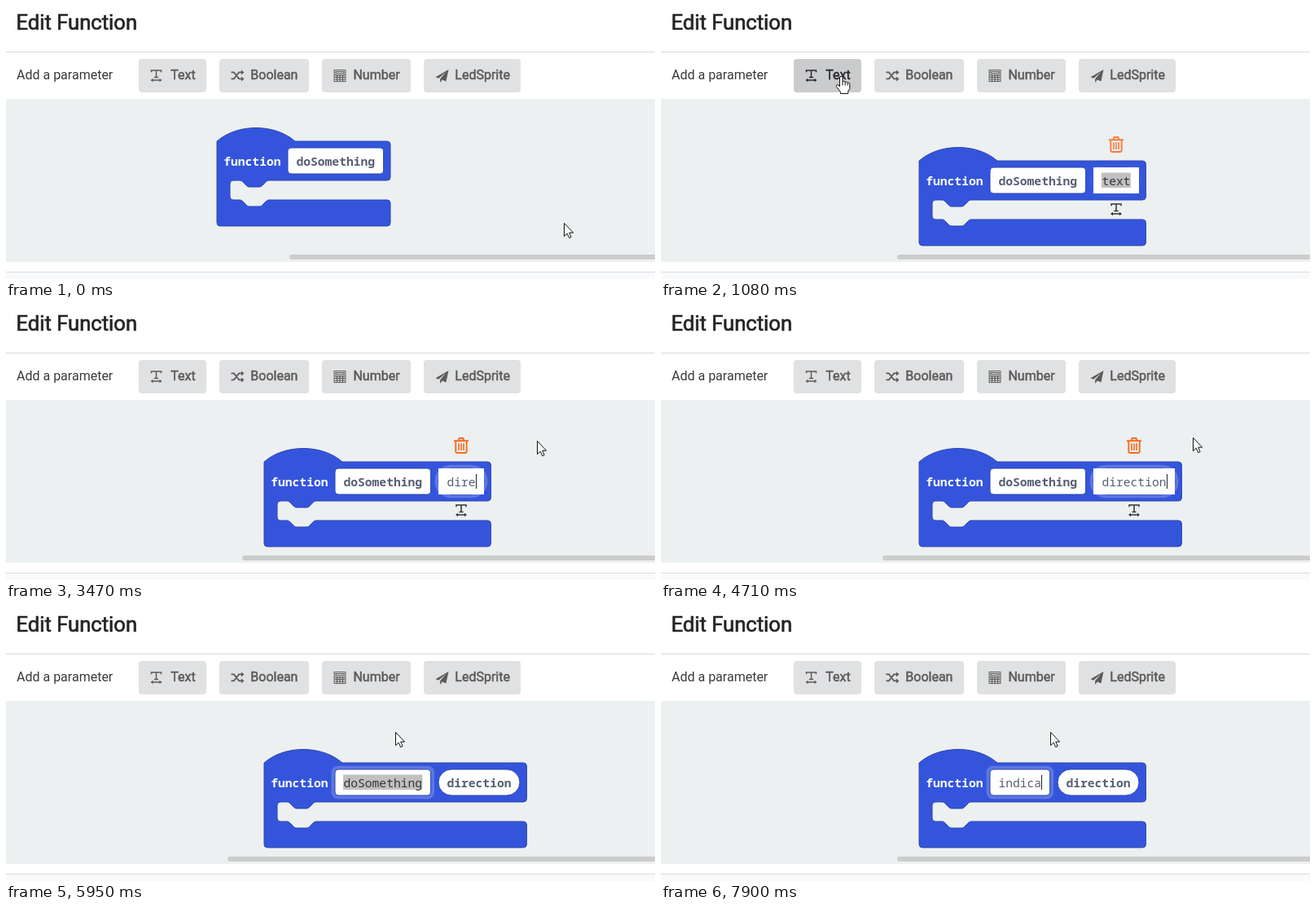
Animation of 797x335 px, one loop 8 s. Source, as an HTML page:

```html
<!DOCTYPE html>
<html lang="en">
<head>
<meta charset="utf-8">
<title>Edit Function</title>
<style>
html, body { margin: 0; width: 100%; height: 100%; overflow: hidden; background: #fff; }
svg { display: block; width: 797px; height: 335px; }
text { white-space: pre; }
.ui { font: 16px Roboto, sans-serif; }
.heavy { stroke-width: .5px; stroke: currentColor; fill: currentColor; }
.mono { font: 14.667px "Noto Sans Mono", "DejaVu Sans Mono", monospace; fill: #575e75; }
.btn { color: #5b5b5c; }
.btn rect.bg { fill: #e0e1e2; }
.btn.hover { color: #29292d; }
.btn.hover rect.bg { fill: #cacbcd; }
.btn.down rect.bg { fill: #babbbc; }
.line { fill: none; stroke: currentColor; }
.solid { fill: currentColor; }
</style>
</head>
<body>
<svg viewBox="0 0 797 335">
  <defs>
    <g id="i-text">
      <path class="line" stroke-width="1.5" d="M1 3.2V.9H13V3.2M7 .9V9.4M4.4 9.4H9.6M2 13H12"/>
      <path class="solid" d="M0 13l3-2.3v4.6zM14 13l-3-2.3v4.6z"/>
    </g>
    <g id="i-bool">
      <path class="line" stroke-width="1.8" d="M0 3.4H3.4L9.6 11.4H13M0 11.4H3.4L9.6 3.4H13"/>
      <path class="solid" d="M12.4 .4l3.6 3-3.6 3zM12.4 8.4l3.6 3-3.6 3z"/>
    </g>
    <g id="i-num">
      <rect class="line" x=".6" y=".6" width="13.8" height="14"/>
      <path class="line" stroke-width="1.2" d="M2.5 2.5H12.5V4.5H2.5zM1 6.6H14M1 9.3H14M1 12H14M4 6.6V14.6M7.5 6.6V14.6M11 6.6V14.6"/>
    </g>
    <path id="i-sprite" class="solid" d="M16 0L0 9.2l3.7 1.6L12.6 3 5.6 11.4V16l2.7-3.5 4.6 2z"/>
  </defs>

  <rect width="797" height="335" fill="#fff"/>
  <text class="ui heavy" x="12.5" y="29" color="#242425" style="font-size:25.6px;stroke-width:.7px">Edit Function</text>
  <rect y="56" width="797" height="1" fill="#d9dadb"/>
  <text class="ui" x="13" y="90" fill="#3a3a3b">Add a parameter</text>
  <g id="buttons"></g>

  <rect y="114" width="797" height="200" fill="#ecf0f1"/>
  <rect y="326" width="797" height="1" fill="#d9dadb"/>
  <rect y="327" width="797" height="8" fill="#f9fafb"/>
  <rect id="scroll" y="305" width="600" height="6" rx="3" fill="#ccc"/>

  <g id="block">
    <path id="body" fill="#3455db" stroke="#2a44af"/>
    <text class="mono" x="8.2" y="30" font-weight="700" style="fill:#fff;font-weight:700">function</text>
    <g id="name"></g>
    <g id="param"></g>
  </g>

  <g id="tools">
    <g fill="none" stroke="#f96a1f" stroke-width="1.9" transform="translate(-9 160)" id="trash">
      <path d="M0 4.2H18M5.4 4L6.6 1H11.4L12.6 4M2.3 4.2V17a2 2 0 0 0 2 2H13.7a2 2 0 0 0 2-2V4.2"/>
      <path stroke-width="1.6" d="M6 7.2V16M9 7.2V16M12 7.2V16"/>
    </g>
    <use href="#i-text" x="-7" y="242" color="#333"/>
  </g>

  <g id="cursor">
    <path id="arrow" fill="#fff" stroke="#111" d="M.5 .5V16.6L4.2 13.2L6.7 18.7L9.1 17.6L6.7 12.2H11.6Z"/>
    <path id="hand" fill="#fff" stroke="#111" stroke-linejoin="round" d="M-1.5 13V2a1.7 1.7 0 0 1 3.5 0V7.6a1.6 1.6 0 0 1 3.2 .4a1.6 1.6 0 0 1 3 .6a1.5 1.5 0 0 1 2.6 1.2V15.5L8.8 18.5V21.5H-.5V19.5L-5.3 13.4a1.6 1.6 0 0 1 2.3-2.4zM2 8V11.5M5.2 8.2V11.5M8.2 8.8V11.5"/>
    <path id="beam" fill="none" stroke="#111" d="M-3.5 -8.5H-1L.5 -7.5L2 -8.5H4.5M.5 -7.5V7.5M-3.5 8.5H-1L.5 7.5L2 8.5H4.5"/>
  </g>
</svg>
<script>
const LOOP = 8000, CHAR = 8.8, PAD = 20.8;
const ADD = 1000, SWITCH = 5400;
const $ = id => document.getElementById(id);

const buttons = [
  [163, 83, 'Text', 'text', 39.2],
  [262, 110, 'Boolean', 'bool', 38.3],
  [388, 109, 'Number', 'num', 38.4],
  [513, 119, 'LedSprite', 'sprite', 38.3]
];
$('buttons').innerHTML = buttons.map(([x, w, label, icon, tx]) => `
  <g class="btn" transform="translate(${x} 65)">
    <rect class="bg" width="${w}" height="41" rx="4"/>
    <use href="#i-${icon}" x="14.5" y="13"/>
    <text class="ui heavy" x="${tx}" y="25">${label}</text>
  </g>`).join('');
const buttonNodes = [...$('buttons').children];

// start, end, steps, x, y
const moves = [
  [150, 920, 11, 221, 86],
  [1460, 1620, 3, 292, 110],
  [1770, 2000, 4, 540, 169],
  [2080, 2230, 3, 652, 164],
  [4710, 4710, 1, 653, 160],
  [4780, 5000, 4, 628, 153],
  [5080, 5400, 5, 480, 212],
  [5550, 5950, 6, 478, 152]
];
const paramKeys = [2840, 3090, 3240, 3470, 3550, 3780, 3850, 4020, 4250];
const nameKeys = [6640, 6790, 7190, 7490, 7660, 7900];

const clamp = v => Math.max(0, Math.min(1, v));
const ease = p => p * p * (3 - 2 * p);
const typed = (word, keys, t) => word.slice(0, keys.filter(k => k <= t).length);

function pointer(t) {
  let x = 685, y = 266;
  for (const [a, b, n, tx, ty] of moves) {
    if (t < a) break;
    const k = n === 1 ? 1 : Math.min(n, Math.floor((t - a) / (b - a) * (n - 1) + 1e-6) + 1);
    const p = n > 6 ? ease(k / n) : k / n;
    x += (tx - x) * p;
    y += (ty - y) * p;
  }
  return [Math.round(x), Math.round(y)];
}

const dip = s => `c${2 * s} 0 ${3 * s} 1 ${4 * s} 2l${4 * s} 4c${s} 1 ${2 * s} 2 ${4 * s} 2h${12 * s}` +
  `c${2 * s} 0 ${3 * s} -1 ${4 * s} -2l${4 * s} -4c${s} -1 ${2 * s} -2 ${4 * s} -2`;
const outline = w => `M0 0c25 -22 71 -22 96 0H${w - 4}a4 4 0 0 1 4 4V44a4 4 0 0 1 -4 4H64${dip(-1)}` +
  `h-8a4 4 0 0 0 -4 4V68a4 4 0 0 0 4 4h8${dip(1)}H${w - 4}a4 4 0 0 1 4 4V100a4 4 0 0 1 -4 4H4a4 4 0 0 1 -4 -4Z`;

// glow is null when the field is not being edited
function field(x, w, text, round, glow, selected) {
  const r = round ? 16 : 4, tx = x + PAD / 2, tw = text.length * CHAR;
  const box = `<rect x="${x}" y="8" width="${w}" height="32" rx="${r}" fill="#fff" stroke="#2a44af"/>`;
  const label = (weight, color) =>
    `<text class="mono" x="${tx}" y="30" style="font-weight:${weight};fill:${color}">${text}</text>`;
  if (glow === null) return box + label(600, '#575e75');
  const halo = `<rect x="${x - 4.5}" y="3.7" width="${w + 9}" height="40.6" rx="${r + 4}" fill="#fff" opacity="${.2 * glow}"/>`;
  const input = round ? `<rect x="${x}" y="8" width="${w}" height="32" fill="#fff"/>` : '';
  const mark = selected
    ? `<rect x="${tx - .4}" y="14.5" width="${tw + .6}" height="18.5" fill="#c0c0c0"/>`
    : `<rect x="${Math.round(tx + tw)}" y="15" width="1" height="18" fill="#222"/>`;
  return halo + box + input + mark + label(400, selected ? '#33353d' : '#575e75');
}

function render(t) {
  const added = t >= ADD, editName = t >= SWITCH, editParam = added && !editName;
  const ox = added ? 317 : 259, oy = added ? 190 : 166;
  const name = typed('indicate', nameKeys, t) || 'doSomething';
  const param = typed('direction', paramKeys, t) || 'text';

  const nameW = name.length * CHAR + PAD;
  const paramX = 87 + nameW + 9.4;
  const paramW = Math.max(2, param.length) * CHAR + PAD;
  const width = (added ? paramX + paramW : 87 + nameW) + 8.4;

  $('block').setAttribute('transform', `translate(${ox} ${oy})`);
  $('body').setAttribute('d', outline(width));
  $('name').innerHTML = field(87, nameW, name, false,
    editName ? clamp((t - SWITCH + 80) / 240) : null, t < nameKeys[0]);
  $('param').innerHTML = added ? field(paramX, paramW, param, true,
    editParam ? clamp((t - 1060) / 170) : null, t < paramKeys[0]) : '';
  $('scroll').setAttribute('x', added ? Math.round(290 + (595.4 - ox - width + 317 - 317) * .41) : 348);

  $('tools').style.display = editParam ? '' : 'none';
  $('tools').setAttribute('transform', `translate(${Math.round(ox + paramX + paramW / 2)} 0)`);
  $('trash').setAttribute('opacity', .85 + .15 * clamp((t - 1080) / 150));

  const [x, y] = pointer(t);
  let over = false;
  buttons.forEach(([bx, w], i) => {
    const hit = x >= bx && x < bx + w && y >= 65 && y < 106;
    over = over || hit;
    buttonNodes[i].classList.toggle('hover', hit);
    buttonNodes[i].classList.toggle('down', hit && t >= ADD && t < ADD + 80);
  });
  const inInput = editName && x > ox + 87 && x < ox + 87 + nameW && y > oy + 8 && y < oy + 40;
  const shape = over ? 'hand' : inInput ? 'beam' : 'arrow';
  for (const id of ['arrow', 'hand', 'beam']) $(id).style.display = id === shape ? '' : 'none';
  $('cursor').setAttribute('transform', `translate(${x} ${y})`);
}

const start = performance.now();
function tick() {
  render((performance.now() - start) % LOOP);
  requestAnimationFrame(tick);
}
tick();
</script>
</body>
</html>
```
